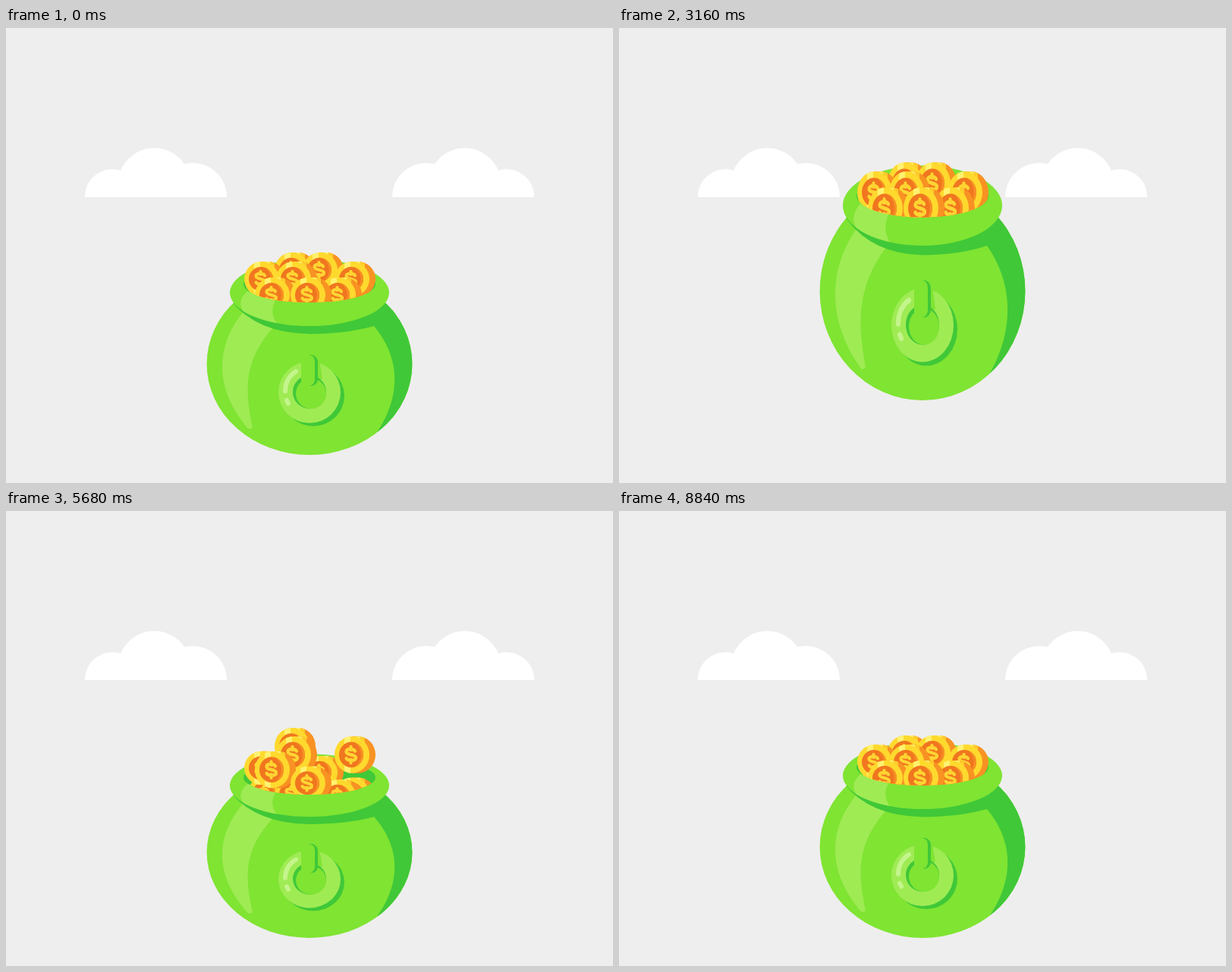
An HTML page that plays this animation: 800 by 600 pixels, repeating every 9000 ms.

```html
<!DOCTYPE html>
<html lang="en">
<head>
<meta charset="utf-8">
<title>Bouncing pot of coins</title>
<style>
  html, body { margin: 0; width: 100%; height: 100%; overflow: hidden; background: #eee; }
  svg { display: block; width: 100vw; height: 100vh; }
  .base { fill: #7fe432; }
  .dark { fill: #40c838; }
  .light { fill: #9feb54; }
  .shine { fill: none; stroke: #c4f58c; stroke-width: 6; stroke-linecap: round; }
</style>
</head>
<body>
<svg viewBox="0 0 800 600">
  <defs>
    <clipPath id="bodyClip"><ellipse cx="400" cy="443" rx="135.4" ry="120"/></clipPath>
    <clipPath id="rimClip"><ellipse cx="400" cy="349" rx="105" ry="44"/></clipPath>
    <clipPath id="mouthClip"><path d="M313 338V-200H487V338A87 24 0 0 1 313 338Z"/></clipPath>
    <clipPath id="faceClip"><circle r="23"/></clipPath>
    <clipPath id="edgeClip"><path d="M0-23H8A23 23 0 0 1 8 23H0Z"/></clipPath>

    <path id="cloud" fill="#fff" d="M104 223A36 36 0 0 1 151 188A48 48 0 0 1 235 179.300A45 45 0 0 1 291 223Z"/>

    <g id="coin">
      <path fill="#f89223" d="M0-23H8A23 23 0 0 1 8 23H0Z"/>
      <g clip-path="url(#edgeClip)">
        <path fill="#ffcb2b" d="M0-24H17V-14H0Z"/>
        <path fill="#fff06e" d="M5-24H11V-14H5Z"/>
      </g>
      <circle r="23" fill="#ffd92e"/>
      <path clip-path="url(#faceClip)" fill="#fff26f" d="M-10-24H-2V24H-10Z"/>
      <circle cx="-1" r="16" fill="#f0761f"/>
      <path fill="#f88f24" d="M3-15.500A16 16 0 0 1 3 15.500A18 18 0 0 0 3-15.500Z"/>
      <g fill="none" stroke="#ffd432" stroke-width="4.200" stroke-linecap="round">
        <path d="M4-4.500C2-8-7.500-8-7.500-3.800C-7.500 .5 5-.5 5 3.800C5 8-5.500 8-7.500 4.500"/>
        <path d="M-1.500-10V-6M-1.500 6V10"/>
      </g>
    </g>
  </defs>

  <rect width="800" height="600" fill="#eee"/>
  <use href="#cloud"/>
  <use href="#cloud" transform="matrix(-1 0 0 1 800 0)"/>

  <g id="pot">
    <ellipse class="base" cx="400" cy="443" rx="135.4" ry="120"/>
    <g clip-path="url(#bodyClip)">
      <path class="light" d="M313 374C275 420 275 475 317 526Q320 531 325 527C315 480 312 440 352 395Z"/>
      <path class="dark" d="M297 360Q330 402 400 403.500Q450 403 485 393C520 435 521 485 489 533L545 535V340H297Z"/>
    </g>

    <ellipse class="dark" cx="405" cy="485" rx="41" ry="40"/>
    <ellipse class="light" cx="400" cy="480.500" rx="41" ry="40.500"/>
    <path class="base" d="M389 438H413L417 463H389Z"/>
    <circle class="dark" cx="400" cy="480" r="22"/>
    <circle class="base" cx="402" cy="482" r="20"/>
    <rect class="dark" x="393" y="431" width="18" height="41" rx="9"/>
    <path class="base" d="M389 431H399Q407 432 407 440V463Q407 470 400 472L389 474Z"/>
    <path class="shine" d="M382 453Q368 462 368 479M370 491L372 495"/>

    <ellipse class="base" cx="400" cy="349" rx="105" ry="44"/>
    <path class="light" clip-path="url(#rimClip)" d="M322 344Q300 360 316 378Q335 390 358 391Q345 374 357 356Z"/>
    <ellipse class="dark" cx="400" cy="338" rx="87" ry="24"/>
    <g id="coins" clip-path="url(#mouthClip)"></g>
  </g>
</svg>

<script>
const BEAT = 1000, STEP = 40, FLOOR = 563;
const LEAP = 160, LAND = 560, REST = 840;

// Rows from back to front; each coin is [centre x, how late it falls, 0 to 1]
const ROWS = [
  { y: 319, coins: [[377, 1], [414, 0]] },
  { y: 331, coins: [[337, 0.6], [456, 1], [379, 1]] },
  { y: 352, coins: [[438, 0], [351, 1], [398, 0.6]] }
];
const FRONT = 352;

// Half a sine wave between two times, zero outside
const arc = (t, from, to) =>
  t > from && t < to ? Math.sin(Math.PI * (t - from) / (to - from)) : 0;

const pot = document.getElementById('pot');
const pile = document.getElementById('coins');

function addCoin(x, y, late) {
  const el = document.createElementNS('http://www.w3.org/2000/svg', 'use');
  el.setAttribute('href', '#coin');
  pile.appendChild(el);
  return { el, x, y, late };
}

// Still coins buried under the pile
for (const x of [341, 377, 456]) {
  addCoin(x, 361, 0).el.setAttribute('transform', `translate(${x} 361)`);
}
const coins = ROWS.flatMap(row => row.coins.map(([x, late]) => addCoin(x, row.y, late)));

const stretch = t => 1 + 0.2 * arc(t, 0, 2 * LEAP) ** 2 - 0.0615 * arc(t, LAND, REST);

function lift(t) {
  const u = Math.min(t / LAND, 1);
  return 353 * u * (1 - u);
}

// Lag at take-off, fly up, then dip and settle
function offset({ y, late }, t) {
  const end = 640 + 120 * late;
  const lag = (FRONT - y) / 6 * arc(t, 0, 2 * LEAP);
  const hop = (40 + 48 * late) * arc(t, LEAP, end) ** 1.4;
  const dip = 20 * (1 - late) * arc(t, end, REST);
  return lag - hop + dip;
}

function draw(t) {
  pot.setAttribute('transform',
    `translate(0 ${FLOOR - lift(t)}) scale(1 ${stretch(t)}) translate(0 ${-FLOOR})`);
  for (const coin of coins) {
    const dy = offset(coin, t);
    const tall = 1 + Math.min(0.12, Math.max(0, -dy) * 0.005);
    coin.el.setAttribute('transform', `translate(${coin.x} ${coin.y + dy}) scale(1 ${tall})`);
  }
}

const start = performance.now();
function tick() {
  const t = (performance.now() - start) % BEAT;
  draw(Math.floor(t / STEP) * STEP);
  requestAnimationFrame(tick);
}
draw(0);
requestAnimationFrame(tick);
</script>
</body>
</html>
```
